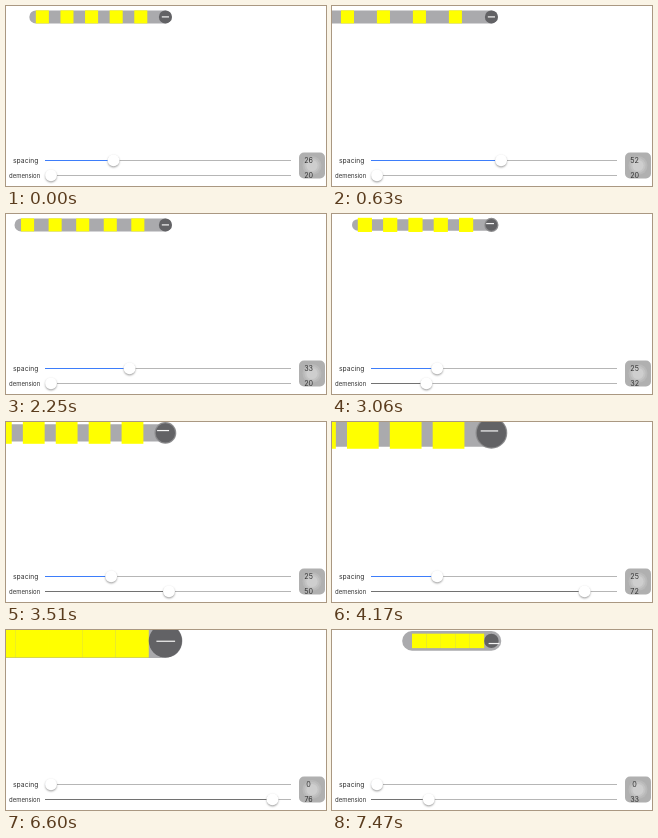
An HTML page with a canvas for the animation above (7.5 s loop, 320 by 180 pixels).

```html
<!DOCTYPE html>
<html lang="en">
<head>
<meta charset="utf-8">
<style>
  html, body { margin: 0; width: 320px; height: 180px; overflow: hidden; background: #fff; }
  canvas { display: block; width: 320px; height: 180px; }
</style>
</head>
<body>
<canvas id="stage"></canvas>
<script>
const canvas = document.getElementById('stage');
const ctx = canvas.getContext('2d');
const ratio = window.devicePixelRatio || 1;
canvas.width = 320 * ratio;
canvas.height = 180 * ratio;
ctx.scale(ratio, ratio);

const LOOP = 7500, STEP = 30;
const POINT = 320 / 736;            // stage pixels per screen point
const CENTER = { x: 159.4, y: 10.9 };
const ITEM_COUNT = 5;
const LAYOUT_LAG = 260;             // the bar trails the button size
const FIRST_RESIZE = 2520, DEFAULT_SIZE = 30;
const TRACK = { left: 39, right: 285, min: 45, max: 280.2 };

const SPACING = [[0, 26.6], [1440, 86.4], [1530, 87.5], [2250, 33.4], [2430, 25.6],
  [5040, 25.6], [5250, 33], [5490, 27.6], [6240, 0]];
const DIMENSION = [[2520, 20], [3120, 34], [3510, 50.1], [4200, 74], [4620, 78.1],
  [6570, 78.1], [6600, 76.5], [7380, 36.6], [7470, 33.2]];

function valueAt(keys, t) {
  if (t <= keys[0][0]) return keys[0][1];
  for (let i = 1; i < keys.length; i++) {
    const [t0, a] = keys[i - 1], [t1, b] = keys[i];
    if (t <= t1) return a + (b - a) * (t - t0) / (t1 - t0);
  }
  return keys[keys.length - 1][1];
}

function itemSize(t) {
  return POINT * (t < FIRST_RESIZE ? DEFAULT_SIZE : valueAt(DIMENSION, t));
}

function rect(x, y, w, h, color) {
  ctx.fillStyle = color;
  ctx.fillRect(x, y, w, h);
}

function circle(x, y, r, color) {
  ctx.fillStyle = color;
  ctx.beginPath();
  ctx.arc(x, y, r, 0, Math.PI * 2);
  ctx.fill();
}

function roundRect(x, y, w, h, r, color) {
  ctx.fillStyle = color;
  ctx.beginPath();
  ctx.roundRect(x, y, w, h, r);
  ctx.fill();
}

function text(label, x, y, size, align = 'left') {
  ctx.font = `${size}px Inter, sans-serif`;
  ctx.textAlign = align;
  ctx.fillStyle = '#333';
  ctx.fillText(label, x, y);
}

function drawMenu(t) {
  const size = itemSize(t);
  const barHeight = itemSize(t - LAYOUT_LAG);
  const pitch = size + valueAt(SPACING, t) * POINT;
  const left = CENTER.x - size / 2, top = CENTER.y - size / 2;
  const barLeft = left - ITEM_COUNT * pitch - barHeight / 2;
  const barRight = CENTER.x + barHeight / 2;

  roundRect(barLeft, CENTER.y - barHeight / 2, barRight - barLeft, barHeight, barHeight / 2, '#aaaaad');
  for (let i = 1; i <= ITEM_COUNT; i++) rect(left - i * pitch, top, size, size, '#ff0');

  const growing = barHeight < size - 1;
  if (growing) circle(CENTER.x, CENTER.y, size / 2, '#8c8c8e');
  circle(CENTER.x, CENTER.y, size / 2 - (growing ? 1.2 : 0), '#626265');

  const dash = Math.max(size, barHeight) * 0.55;
  rect(left + barHeight / 2 - dash / 2, top + barHeight / 2 - 0.6, dash, 1.2, '#f4f4f4');
}

function drawSlider(y, fraction, activeColor) {
  const x = TRACK.min + (TRACK.max - TRACK.min) * fraction;
  rect(TRACK.left, y - 0.5, TRACK.right - TRACK.left, 1, '#b6b6b6');
  rect(TRACK.left, y - 0.5, x - TRACK.left, 1, activeColor);
  ctx.save();
  ctx.shadowColor = 'rgba(0, 0, 0, 0.35)';
  ctx.shadowBlur = 2 * ratio;
  ctx.shadowOffsetY = 1.2 * ratio;
  circle(x, y - 0.2, 5.9, '#fff');
  ctx.restore();
}

function drawTouchPad() {
  roundRect(293, 146.5, 26, 26, 5, '#b0b0b0');
  circle(306, 159.5, 9.5, '#b9b9b9');
  circle(306, 159.5, 7.6, '#c3c3c3');
  circle(306, 159.5, 5.6, '#cecece');
}

function draw(t) {
  const spacing = valueAt(SPACING, t), dimension = valueAt(DIMENSION, t);
  rect(0, 0, 320, 180, '#fff');
  drawMenu(t);
  text('spacing', 7, 156.8, 6.8);
  text('demension', 3, 171.6, 6);
  drawSlider(154.5, spacing / 100, '#3d7dfa');
  drawSlider(169.5, (dimension - 20) / 60, '#727272');
  drawTouchPad();
  text(Math.floor(spacing), 302.6, 157, 7.2, 'center');
  text(Math.floor(dimension), 302.6, 172.2, 7.2, 'center');
}

const start = performance.now();
function tick() {
  const t = (performance.now() - start) % LOOP;
  draw(Math.floor(t / STEP) * STEP);
  requestAnimationFrame(tick);
}
tick();
</script>
</body>
</html>
```
